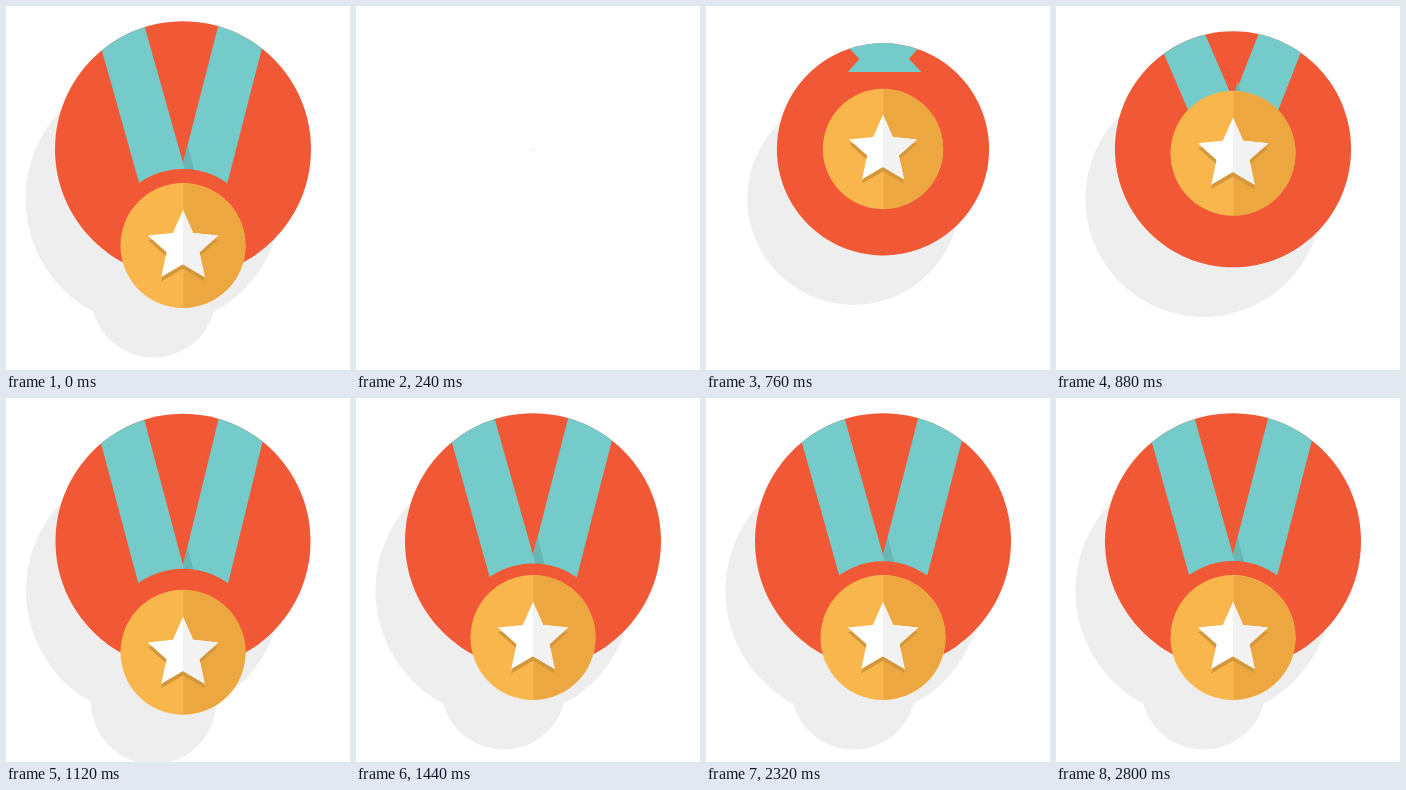
Recreate the animation shown at these times as an HTML page with a canvas. Size 344x364 px, loop 4800 ms.

```html
<!DOCTYPE html>
<html>
<head>
<meta charset="utf-8">
<style>
html, body { margin: 0; width: 100%; height: 100%; overflow: hidden; background: #fff; }
canvas { display: block; }
</style>
</head>
<body>
<canvas id="stage" width="344" height="364"></canvas>
<script>
const ctx = document.getElementById('stage').getContext('2d');
const LOOP = 4800, STEP = 40, CX = 177, CY = 143.3, REST = 239.5;
const RED = '#f05836', TEAL = '#75cbc9', GREY = '#eee';

const clamp = v => Math.max(0, Math.min(1, v));
const part = (t, a, b) => clamp((t - a) / (b - a));
const smooth = p => p * p * (3 - 2 * p);
const mix = (a, b, p) => a + (b - a) * p;

// Bezier ease with control points (.4, 0) and (.23, 1)
function ease(x) {
  let lo = 0, hi = 1;
  for (let i = 0; i < 24; i++) {
    const s = (lo + hi) / 2, u = 1 - s;
    if (1.2 * u * u * s + 0.69 * u * s * s + s * s * s < x) lo = s; else hi = s;
  }
  return smooth(lo);
}

// Disc whose top is still dented while dent > 0
function disc(r, dent) {
  const p = new Path2D(), k = 0.5523;
  const x = v => CX + v * r, y = v => CY + v * r;
  const tx = mix(0, -0.08, dent), ty = mix(-1, -0.73, dent);
  p.moveTo(x(-1), y(0));
  p.bezierCurveTo(x(-1), y(k), x(-k), y(1), x(0), y(1));
  p.bezierCurveTo(x(k), y(1), x(1), y(k), x(1), y(0));
  p.bezierCurveTo(x(1), y(-k), x(mix(k, 0.46, dent)), y(mix(-1, -1.23, dent)), x(tx), y(ty));
  p.bezierCurveTo(x(mix(-k, -0.36, dent)), y(mix(-1, -1.03, dent)), x(-1), y(-k), x(-1), y(0));
  return p;
}

function circle(x, y, r, color) {
  ctx.fillStyle = color;
  ctx.beginPath();
  ctx.arc(x, y, r, 0, 7);
  ctx.fill();
}

function poly(points, color) {
  ctx.fillStyle = color;
  ctx.beginPath();
  points.forEach(([x, y]) => ctx.lineTo(x, y));
  ctx.fill();
}

// Ribbon strip hung above the stage, its inner edge passing (CX, apex)
function strip(inner, outer, apex) {
  const top = -28, low = apex + 40;
  const dx = (CX - inner) * (low - top) / (apex - top);
  poly([[inner, top], [inner + dx, low], [outer + dx, low], [outer, top]], TEAL);
}

const star = Array.from({ length: 10 }, (_, i) => {
  const a = (i / 5 - 0.5) * Math.PI, r = i % 2 ? 17.3 : 37;
  return [r * Math.cos(a), 1.5 + r * Math.sin(a)];
});

function medal(y, scale) {
  ctx.save();
  ctx.translate(CX, y);
  ctx.scale(scale, scale);
  circle(0, 0, 62.5, '#f9b64d');
  ctx.fillStyle = '#eca741';
  ctx.beginPath();
  ctx.arc(0.5, 0, 62, -Math.PI / 2, Math.PI / 2);
  ctx.fill();
  poly(star.map(([x, y]) => [x, y + 4.5]), '#d3983c');
  poly(star, '#fff');
  poly([...star.slice(0, 6), star[0]], '#f2f2f2');
  ctx.restore();
}

function draw(t) {
  const r = 128 * ease(part(t, 200, 1200));
  const body = disc(r, part(t, 760, 520));
  const size = 1 - (1 - part(t, 600, 840)) ** 3;
  const y = t < 980 ? mix(143, 259.5, smooth(part(t, 867, 980)))
                    : mix(259.5, REST, smooth(part(t, 980, 1400)));
  const sway = y - REST;
  const apex = mix(-20, 157 + 0.69 * sway, smooth(part(t, 680, 860)));
  const lag = t < 1440 ? 2.5 * part(t, 1120, 1440) : 2.5 * Math.exp((1440 - t) / 450);
  const gap = REST + sway * (sway < 0 ? 0.69 : 0.52) + lag;

  ctx.fillStyle = '#fff';
  ctx.fillRect(0, 0, 344, 364);

  ctx.save();
  ctx.translate(-29.5, 49.5);
  ctx.fillStyle = GREY;
  ctx.fill(body);
  circle(CX, y, 62.5 * size, GREY);
  ctx.restore();

  ctx.fillStyle = RED;
  ctx.fill(body);

  if (t > 680) {
    ctx.save();
    ctx.clip(body);
    strip(224.5, 274, apex);
    poly([[181.6, apex - 18], [190, apex + 14], [173.4, apex + 14]], '#69b7b5');
    strip(125, 75.5, apex);
    circle(CX, gap, 76.5, RED);
    ctx.restore();
  }
  if (size > 0) medal(y, size);
}

function frame(now) {
  const t = Math.floor((now % LOOP) / STEP) * STEP;
  draw(t < 200 ? LOOP : t);
  requestAnimationFrame(frame);
}
draw(LOOP);
requestAnimationFrame(frame);
</script>
</body>
</html>
```
